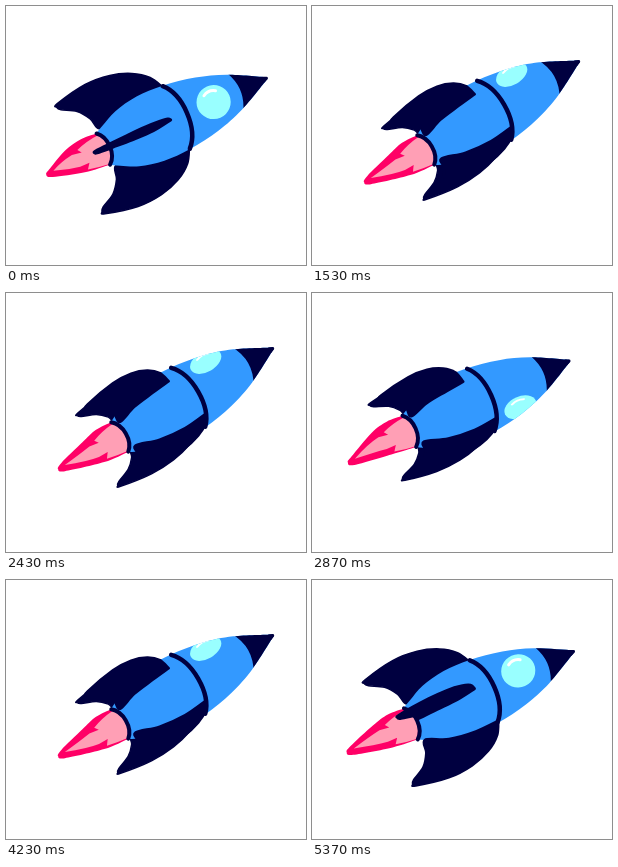
Recreate the animation shown at these times as an HTML page with a canvas. Size 300 px wide and 259 px high, loop 5410 ms.

```html
<!DOCTYPE html>
<html lang="en">
<head>
<meta charset="utf-8">
<title>Rocket</title>
<style>
html, body { margin: 0; width: 100%; height: 100%; overflow: hidden; background: #fff; }
canvas { display: block; width: 300px; height: 259px; }
</style>
</head>
<body>
<canvas id="stage"></canvas>
<script>
const W = 300, H = 259, LOOP = 5410, STEP = 100 / 3, CYCLE = 27, LENGTH = 179;
const NAVY = '#000040', BLUE = '#3399ff', GLASS = '#99ffff', RED = '#ff0066', PINK = '#ff9fb5';

const canvas = document.getElementById('stage');
const ctx = canvas.getContext('2d');
const dpr = window.devicePixelRatio || 1;
canvas.width = W * dpr;
canvas.height = H * dpr;

// Local axes: u runs from the nozzle to the nose, v runs across the hull.
const PROFILE = [[0, 17], [10, 22], [27, 30], [52, 35], [80, 34.5], [113, 29], [143, 19], [178, 1]];
// Fin outline: position along the hull, radius, half thickness.
const FIN = [
  [80, 33, 0], [72, 47, 2], [57, 58, 3], [36, 65, 3.5], [10, 66.5, 3], [-23, 60, 1.5],
  [-25, 57, 0], [-22, 53, -1], [-8, 45, -2], [1, 33, -2], [6, 20, -2], [28, 29, -3], [55, 33, -3]
];

const wave = (f, peak) => Math.cos((f - peak) * 2 * Math.PI / CYCLE);

// Catmull-Rom spline through the points, appended to the current path.
function spline(points) {
  const at = i => points[Math.max(0, Math.min(points.length - 1, i))];
  ctx.lineTo(...points[0]);
  for (let i = 0; i < points.length - 1; i++) {
    const [a, b, c, d] = [at(i - 1), at(i), at(i + 1), at(i + 2)];
    ctx.bezierCurveTo(
      b[0] + (c[0] - a[0]) / 6, b[1] + (c[1] - a[1]) / 6,
      c[0] - (d[0] - b[0]) / 6, c[1] - (d[1] - b[1]) / 6,
      c[0], c[1]);
  }
}

function fill(color) {
  ctx.fillStyle = color;
  ctx.fill();
}

function stroke(color, width) {
  ctx.strokeStyle = color;
  ctx.lineWidth = width;
  ctx.stroke();
}

function hullPath() {
  ctx.beginPath();
  spline(PROFILE);
  spline(PROFILE.map(([u, r]) => [u, -r]).reverse());
  ctx.quadraticCurveTo(14, 0, 0, 17);
  ctx.closePath();
}

function ring(u, r, bulge, width) {
  ctx.beginPath();
  ctx.moveTo(u, r);
  ctx.bezierCurveTo(u + bulge * 1.33, r * 0.55, u + bulge * 1.33, -r * 0.55, u, -r);
  stroke(NAVY, width);
}

function fin(deg) {
  const a = deg * Math.PI / 180, front = Math.max(0, Math.cos(a));
  const shrink = 1 - 17 / 80 * Math.exp(-(((deg - 22) / 45) ** 4));
  const points = FIN.map(([s, r, w]) => [
    (s > 0 ? s * shrink : s) + 0.3 * r * front,
    r * Math.sin(a) + w * front
  ]);
  ctx.beginPath();
  spline([...points, points[0]]);
  ctx.closePath();
  fill(NAVY);
  stroke(NAVY, 1.5 + 1.5 * front);
}

function flame(length, sway) {
  ctx.beginPath();
  spline([[1, 17], [-16, 18], [-34, 14], [-length + 6, sway + 4], [-length, sway],
    [-length + 5, sway - 5], [-25, -14], [0, -17]]);
  ctx.quadraticCurveTo(14, 0, 1, 17);
  fill(RED);

  const tip = -length + 8;
  ctx.beginPath();
  ctx.moveTo(2, 15);
  ctx.quadraticCurveTo(-12, 14, -23, 9.5);
  ctx.lineTo(-20, 5.5);
  ctx.lineTo(-30, 7);
  ctx.quadraticCurveTo(-43, 5, tip, sway + 0.5);
  ctx.quadraticCurveTo(-40, -5, -27, -7);
  ctx.lineTo(-17, -7);
  ctx.lineTo(-21, -12.5);
  ctx.quadraticCurveTo(-10, -15, 0, -16);
  ctx.quadraticCurveTo(14, 0, 2, 15);
  fill(PINK);
}

function porthole(roll) {
  const squash = Math.cos(roll * 1.15 * Math.PI / 180);
  ctx.save();
  ctx.translate(120 - 7 * (roll / 46) ** 2, roll * 0.5 - 0.8);
  ctx.scale(1, squash);
  ctx.beginPath();
  ctx.arc(0, 0, 17, 0, 2 * Math.PI);
  fill(GLASS);
  ctx.beginPath();
  ctx.arc(0, 0, 11.5, 1, 2.15);
  stroke('#fff', 3);
  ctx.restore();
}

function draw(f) {
  const nose = [263.2 + 4.8 * wave(f, 19), 60.5 - 11.5 * wave(f, 14.5)];
  const tail = [105 + 10.3 * wave(f, 16), 141.4 + 2.1 * wave(f, 0) - 3.8 * wave(f, 6.75)];
  const roll = -48 * wave(f, 6.75);
  const dx = nose[0] - tail[0], dy = nose[1] - tail[1], len = Math.hypot(dx, dy);

  ctx.setTransform(dpr, 0, 0, dpr, 0, 0);
  ctx.fillStyle = '#fff';
  ctx.fillRect(0, 0, W, H);
  ctx.lineCap = ctx.lineJoin = 'round';
  ctx.transform(dx / LENGTH, dy / LENGTH, dy / len, -dx / len, tail[0], tail[1]);

  const fins = [0, 90, 180, -90].map(a => {
    const deg = a + roll;
    return deg > 180 ? deg - 360 : deg;
  });
  const inFront = deg => Math.abs(deg) < 88;

  fins.filter(deg => !inFront(deg)).forEach(fin);
  flame(66 - 5 * Math.cos(f * 2 * Math.PI / 3), roll / 14 - 0.5);

  hullPath();
  fill(BLUE);
  ctx.save();
  ctx.clip();
  porthole(roll);
  ctx.beginPath();
  ctx.moveTo(141, 25);
  ctx.quadraticCurveTo(157, 0, 141, -25);
  ctx.lineTo(190, -25);
  ctx.lineTo(190, 25);
  fill(NAVY);
  ctx.restore();

  ctx.beginPath();
  ctx.moveTo(174, 1.5);
  ctx.lineTo(177.5, 0);
  ctx.lineTo(174, -1.5);
  stroke(NAVY, 3);

  ring(80, 34, 11.5, 4.5);
  ring(1, 17, 7, 4);
  fins.filter(inFront).forEach(fin);
}

const start = performance.now();
function tick() {
  const t = (performance.now() - start) % LOOP;
  draw(Math.min(161, Math.floor((t + 5) / STEP)));
  requestAnimationFrame(tick);
}
tick();
</script>
</body>
</html>
```
